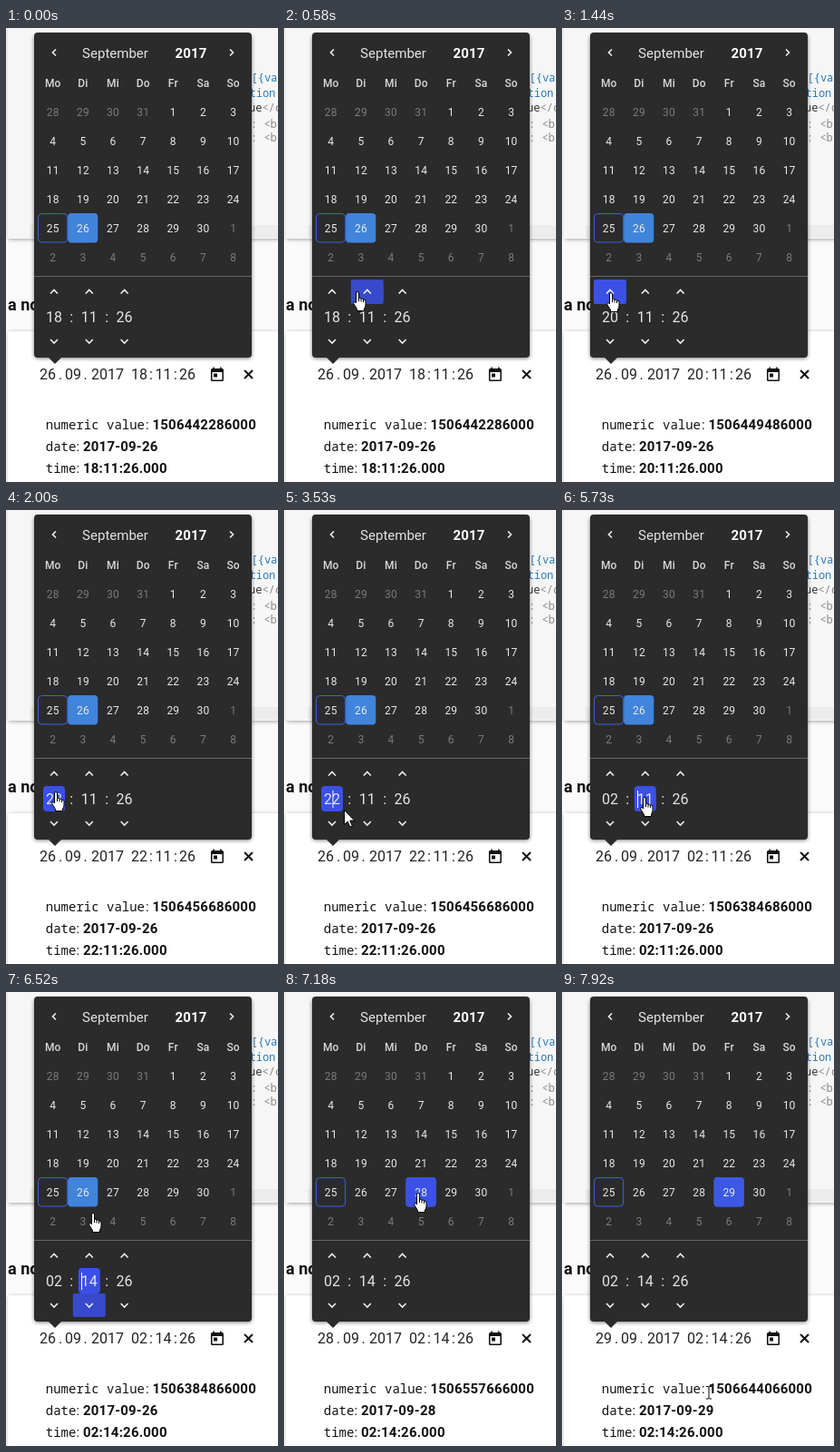
Animation of 300 by 500 pixels, one loop 8000 ms. Source, as an HTML page:

```html
<!DOCTYPE html>
<html lang="en">
<head>
<meta charset="utf-8">
<title>Date and time picker</title>
<style>
  html, body { margin: 0; width: 100%; height: 100%; overflow: hidden; background: #fafafa; }
  svg { display: block; width: 300px; height: 500px; }
  text { font-family: Roboto, sans-serif; white-space: pre; }
  .mid { text-anchor: middle; }
  .mono { font: 14px "Noto Sans Mono", monospace; }
  .code { font: 12px "Noto Sans Mono", monospace; }
  .val { font-size: 15px; font-weight: 700; letter-spacing: .2px; }
  .day { font-size: 12px; letter-spacing: .2px; text-anchor: middle; }
  .num { font-size: 16px; text-anchor: middle; }
  .line { fill: none; stroke: #eee; stroke-width: 1.6; }
</style>
</head>
<body>
<svg id="stage" viewBox="0 0 300 500">
  <defs>
    <filter id="soft" x="-20%" y="-20%" width="140%" height="140%"><feGaussianBlur stdDeviation="2"/></filter>
  </defs>
</svg>
<script>
const LOOP = 8000, TICK = 110, ACCENT = '#3b50e6';
const stage = document.getElementById('stage');

function add(tag, attrs, text) {
  const el = document.createElementNS('http://www.w3.org/2000/svg', tag);
  for (const k in attrs) el.setAttribute(k, attrs[k]);
  if (text !== undefined) el.textContent = text;
  stage.append(el);
  return el;
}
const rect = (x, y, width, height, fill, rx = 0, more = {}) =>
  add('rect', { x, y, width, height, fill, rx, ...more });
const label = (x, y, cls, text, fill = '#e4e4e4', more = {}) =>
  add('text', { x, y, class: cls, fill, ...more }, text);
const setText = (el, s) => { if (el.textContent !== s) el.textContent = s; };
const show = (el, alpha) => { el.style.opacity = +alpha; };
const two = n => String(n).padStart(2, '0');

// Page behind the picker
function card(y, h, fill) {
  rect(3, y + 1, 310, h, '#000', 1, { opacity: .35, filter: 'url(#soft)' });
  rect(2, y, 310, h, fill, 1);
}
card(-20, 252, '#f6f6f6');
rect(26, 217, 280, 14, '#ececec');
card(334, 190, '#fff');
label(270.5, 59, 'code', '[{val', '#2a7ab8');
label(268.5, 76, 'code', 'tion', '#2a7ab8');
label(268, 92, 'code', 'ue', '#333');
label(282.4, 92, 'code', '</c', '#888');
for (const y of [110, 125]) label(270, y, 'code', ': <b', '#888');
label(2, 311, '', 'a no', '#111', { 'font-size': 18, 'font-weight': 700 });

// Input line
const put = (x, s) => label(x, 387, 'num', s, '#222');
const inDay = put(46, ''), inHour = put(147, ''), inMin = put(173.5, '');
put(60, '.'); put(74, '09'); put(87.5, '.'); put(112, '2017');
put(160, ':'); put(187, ':'); put(200, '26');
add('path', {
  transform: 'translate(223.6 372.7) scale(.78)', fill: '#111',
  d: 'M19 3h-1V1h-2v2H8V1H6v2H5a2 2 0 0 0-2 2v14a2 2 0 0 0 2 2h14a2 2 0 0 0 2-2V5a2 2 0 0 0-2-2zm0 16H5V8h14zM7 10h5v5H7z'
});
add('path', { d: 'M263 377l9 9m0-9l-9 9', stroke: '#111', 'stroke-width': 2 });

// Result lines
function result(y, name, x) {
  label(43.8, y, 'mono', name, '#111');
  label(x - 7.6, y, '', ':', '#111', { 'font-size': 15 });
  return label(x, y, 'val', '', '#111');
}
const outNum = result(442, 'numeric value', 161.5);
const outDate = result(466, 'date', 85);
const outTime = result(490, 'time', 85);

// Picker panel
rect(31, 8, 240, 356, '#000', 4, { opacity: .5, filter: 'url(#soft)' });
rect(31, 5, 240, 358, '#2b2b2b', 4);
add('path', { d: 'M46 362h16l-8 8z', fill: '#2b2b2b' });
rect(31, 273, 240, 1, '#666');
add('path', { d: 'M55 23.5l-3.5 3.5 3.5 3.5M247 23.5l3.5 3.5-3.5 3.5', class: 'line' });
label(120.5, 33, 'mid', 'September', '#e4e4e4', { 'font-size': 15 });
label(204, 33, 'mid', '2017', '#fff', { 'font-size': 15, 'font-weight': 700, 'letter-spacing': .2 });

// Calendar grid
const COL = 232 / 7, ROW = 32;
const cellX = i => 35 + COL * (i % 7);
const cellY = i => 76 + ROW * Math.floor(i / 7);
const mid = i => cellX(i) + COL / 2 + .2;

const zones = [];
function zone(x, y, w, h, rx, field) {
  zones.push({ x, y, w, h, field, el: rect(x, y, w, h, ACCENT, rx) });
}
const selected = rect(0, cellY(28), COL, ROW + .5, '#4084db', 4);
for (let i = 4; i < 34; i++) zone(cellX(i), cellY(i), COL, ROW + .5, 4);
rect(cellX(28) + .5, cellY(28) + .5, COL - 1, ROW - .5, 'none', 4, { stroke: '#3a62e0' });

'Mo Di Mi Do Fr Sa So'.split(' ').forEach((d, i) =>
  label(mid(i), 65, 'day', d, '#d8d8d8', { 'font-weight': 500 }));
for (let i = 0; i < 42; i++) {
  const inMonth = i > 3 && i < 34;
  label(mid(i), cellY(i) + 21, 'day', new Date(2017, 7, 28 + i).getDate(), inMonth ? '#e8e8e8' : '#7d797f');
}

// Hour, minute and second columns
const boxes = ['hour', 'minute', 'second'].map((name, i) => {
  const x = 53 + 38.8 * i;
  zone(x - 18, 277, 36, 27, 2);
  zone(x - 18, 332, 36, 26, 2);
  zone(x - 12, 304, 24, 28, 4, name);
  add('path', { d: `M${x - 4} 292.5l4-4 4 4M${x - 4} 343l4 4 4-4`, class: 'line' });
  if (i) label(x - 19.5, 324, 'num', ':');
  return label(x, 324, 'num', '26');
});
const caret = rect(0, 309, 1, 19, '#fff');

// Pointers, each drawn around its hot spot
const outline = { fill: '#fff', stroke: '#000', 'stroke-linejoin': 'round' };
const pointers = {
  arrow: add('path', { ...outline, d: 'M.5.5v16l3.7-3.5 2.6 6 2.5-1.1-2.6-5.8h5z' }),
  hand: add('path', {
    ...outline,
    d: 'M-1.5 12V1Q-1.5-.5 0-.5T1.5 1V6.5Q3 5.5 4 7.2 5.6 6.5 6.5 8.2 9 7.5 9 10V14Q9 16.5 7.5 18V20.5H-.5V18.5L-4 13Q-5 10.5-3 10.2L-1.5 12M1.5 6.5V10M4 7.2V10.5M6.5 8.2V11'
  }),
  beam: add('path', { d: 'M-3-6.5h2.5l.5.5.5-.5H3M0-6V6.5M-3 7h2.5l.5-.5.5.5H3', fill: 'none', stroke: '#000' })
};

// Pointer stops: arrival tick, ticks of travel, x, y
const stops = [
  [1, 1, 106, 387], [5, 4, 81, 291], [7, 2, 54, 292], [17, 1, 55, 311], [23, 3, 60, 341],
  [29, 1, 66, 330], [37, 3, 75, 329], [44, 2, 62, 343], [46, 2, 72, 337], [50, 4, 91, 317],
  [53, 1, 92, 342], [59, 1, 96, 244], [62, 3, 148, 222], [67, 1, 184, 222], [72, 1, 162, 441]
];
const ease = v => v * v * (3 - 2 * v);

function pointerAt(tick) {
  let [, , x, y] = stops[0];
  for (const [end, span, tx, ty] of stops) {
    const f = ease(Math.max(0, Math.min(1, (tick - end + span) / span)));
    x += (tx - x) * f;
    y += (ty - y) * f;
  }
  return { x, y };
}
const inside = (p, z) => p.x >= z.x && p.x < z.x + z.w && p.y >= z.y && p.y < z.y + z.h;

function shapeAt(p) {
  if (p.y > 430) return 'beam';
  return p.y < 270 || zones.some(z => inside(p, z)) ? 'hand' : 'arrow';
}

// What the user does, in ms
const hourUp = [1120, 1440, 1600, 1750], minuteUp = [5850, 6070, 6250], typing = [4310, 4430];
const FOCUS_HOUR = 2090, HOUR_SET = 4750, FOCUS_MINUTE = 5720, PICK_28 = 7040, PICK_29 = 7690;
const inputs = [FOCUS_HOUR + 330, ...typing, HOUR_SET, FOCUS_MINUTE, ...minuteUp];
const count = (times, t) => times.filter(v => v <= t).length;

function draw(t) {
  const h = t < HOUR_SET ? 18 + count(hourUp, t) : 2;
  const m = 11 + count(minuteUp, t);
  const d = t < PICK_28 ? 26 : t < PICK_29 ? 28 : 29;
  const typed = '02'.slice(0, count(typing, t));
  const focus = t < FOCUS_HOUR || t >= PICK_28 ? '' : t < FOCUS_MINUTE ? 'hour' : 'minute';

  setText(inDay, two(d));
  setText(inHour, two(h));
  setText(inMin, two(m));
  setText(boxes[0], typed || two(h));
  setText(boxes[1], two(m));
  setText(outNum, `${1506376800 + (d - 26) * 86400 + h * 3600 + m * 60 + 26}000`);
  setText(outDate, `2017-09-${d}`);
  setText(outTime, `${two(h)}:${two(m)}:26.000`);
  selected.setAttribute('x', cellX(d + 3));

  // Hover fades over one tick; a focused field stays lit
  const tick = Math.floor(t / TICK), now = pointerAt(tick), before = pointerAt(tick - 1);
  for (const z of zones) {
    const hits = inside(now, z) + inside(before, z);
    show(z.el, z.field ? z.field === focus || inside(now, z) : hits === 1 ? .85 : hits / 2);
  }

  const since = t - Math.max(...inputs.filter(v => v <= t));
  show(caret, focus && since % 1060 < 530);
  caret.setAttribute('x', focus === 'minute' ? 83 : 53.5 + 4 * typed.length);

  const shape = tick ? shapeAt(now) : '';
  for (const k in pointers) {
    show(pointers[k], k === shape);
    pointers[k].setAttribute('transform', `translate(${Math.round(now.x)} ${Math.round(now.y)})`);
  }
}

const start = performance.now();
function loop() {
  draw((performance.now() - start) % LOOP);
  requestAnimationFrame(loop);
}
loop();
</script>
</body>
</html>
```
